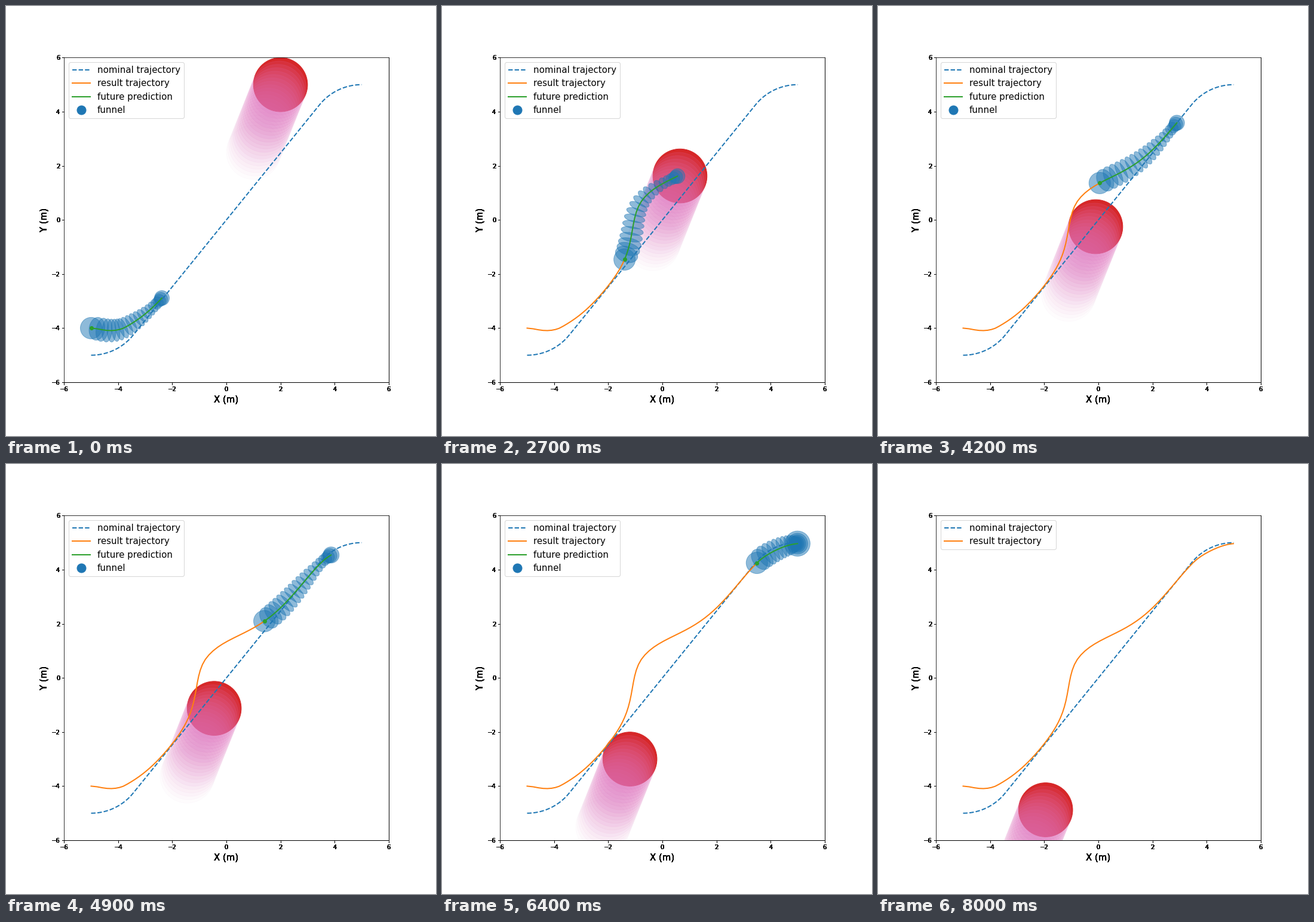
Animation, 720 px wide and 720 px high, one loop 8.1 s. Source, as a matplotlib script:

```python
import numpy as np
import matplotlib.pyplot as plt
from matplotlib.animation import FuncAnimation
from matplotlib.lines import Line2D
from matplotlib.patches import Circle, Ellipse

STEPS = 80
HORIZON = 20
UNIT = 45.3  # pixels per metre

# Nominal path: arc, straight line through the origin, arc
GOAL = 5
RADIUS = 2
SLOPE = np.arctan(0.6) + np.arcsin(2 / np.sqrt(34))
STRAIGHT = (GOAL - RADIUS * np.sin(SLOPE)) / np.cos(SLOPE)
HALF = STRAIGHT + RADIUS * SLOPE
LENGTH = 2 * HALF


def nominal(s):
    """Point and left normal at distance s along the nominal path."""
    v = np.clip(s, 0, LENGTH) - HALF
    heading = np.minimum(SLOPE, (HALF - np.abs(v)) / RADIUS)
    normal = np.array([-np.sin(heading), np.cos(heading)])
    arc = np.sign(v) * (np.array([[GOAL], [GOAL - RADIUS]]) + RADIUS * normal)
    line = np.outer([np.cos(SLOPE), np.sin(SLOPE)], v)
    return np.where(np.abs(v) < STRAIGHT, line, arc), normal


def bell(x, width):
    return np.exp(-(x / width) ** 2)


def travelled(t):
    """Distance at step t: quick start, hesitation, soft stop."""
    s = 0.1995 * t + 0.28 * t * np.exp(-t / 4) - 0.16 * bell(t - 29, 10)
    return s - 0.4 * np.log1p(np.exp((s - LENGTH) / 0.4))


def drive(t, evade=1.0):
    s = travelled(t)
    swerve = s - HALF - 0.15
    offset = (bell(s, 1.93) - 0.1 * bell(s - 13.6, 0.9)
              + evade * 1.04 * bell(swerve, np.where(swerve < 0, 1.6, 1.92)))
    point, normal = nominal(s)
    return point + offset * normal


def predict(step):
    j = np.arange(HORIZON + 1)
    tau = step + j - 0.069 * np.clip(j - 14, 0, None) ** 2
    return drive(tau, np.clip((step - 14) / 6, 0, 1))


def funnel_axes(step):
    """Half axes along and across the path, in metres."""
    j = np.arange(HORIZON + 1)
    end = min(24, 12.5 + 11 * (step / 66) ** 8)
    grow = np.clip((j - 13) / 7, 0, 1) ** 2
    lengthwise = 6 + 12 * np.exp(-j / 1.9) + (end - 6) * grow
    across = (20 - 2 * np.exp(-j)) * (1 - (j / HORIZON) ** 2) + end * grow
    return lengthwise / UNIT, across / UNIT


def obstacle_at(step):
    return 2 - 0.05 * step, 5 - 0.125 * step


def overdraw(artist, times=10):
    """Harden the soft edges by drawing repeatedly."""
    draw = artist.draw

    def repeat(renderer):
        for _ in range(times):
            draw(renderer)
    artist.draw = repeat


plt.rcParams.update({"font.family": "DejaVu Sans", "font.size": 10})
fig = plt.figure(figsize=(10, 10), dpi=72, facecolor="white")
ax = fig.add_axes([0.135, 0.125, 0.755, 0.755])
ax.set(xlim=(-6, 6), ylim=(-6, 6), xticks=range(-6, 7, 2), yticks=range(-6, 7, 2))
ax.set_xlabel("X (m)", fontsize=15)
ax.set_ylabel("Y (m)", fontsize=15)
for axis in (ax.xaxis, ax.yaxis):
    overdraw(axis.label)
    for tick in axis.get_major_ticks():
        overdraw(tick.label1)
        overdraw(tick.tick1line)
for side in ("right", "bottom"):
    overdraw(ax.spines[side])

result = drive(np.arange(STEPS + 1))
nominal_line, = ax.plot(*nominal(np.linspace(0, LENGTH, 201))[0], "--", lw=2,
                        color="tab:blue", label="nominal trajectory")
result_line, = ax.plot([], [], lw=2, color="tab:orange", label="result trajectory")
future_line, = ax.plot([], [], lw=2, color="tab:green", label="future prediction")
robot, = ax.plot([], [], "o", ms=6, color="tab:green")
funnel_key = Line2D([], [], ls="none", marker="o", ms=15, color="tab:blue", label="funnel")

obstacle = ax.add_patch(Circle((0, 0), 1, color="tab:red"))
trail = [ax.add_patch(Circle((0, 0), 1, color="tab:pink", alpha=0.14 * (1 - j / 23)))
         for j in range(1, HORIZON + 1)]
funnel = [ax.add_patch(Ellipse((0, 0), 1, 1, color="tab:blue", alpha=0.5))
          for _ in range(HORIZON + 1)]

handles = [nominal_line, result_line, future_line, funnel_key]
full_legend = ax.legend(handles=handles, loc="upper left", fontsize=15)
ax.add_artist(full_legend)
short_legend = ax.legend(handles=handles[:2], loc="upper left", fontsize=15)


def update(step):
    running = step < STEPS
    result_line.set_data(*result[:, :step + 1])

    now = min(step, STEPS - 1)
    obstacle.center = obstacle_at(now)
    for j, ghost in enumerate(trail, 1):
        ghost.center = obstacle_at(now + j)

    path = predict(now)
    future_line.set_data(*path)
    robot.set_data(path[0, :1], path[1, :1])
    dx, dy = np.gradient(path, axis=1)
    headings = np.degrees(np.arctan2(dy, dx))
    for ring, center, angle, a, b in zip(funnel, path.T, headings, *funnel_axes(now)):
        ring.set_center(center)
        ring.set_width(2 * a)
        ring.set_height(2 * b)
        ring.set_angle(angle)

    for artist in (future_line, robot, full_legend, *funnel):
        artist.set_visible(running)
    short_legend.set_visible(not running)
    return []


anim = FuncAnimation(fig, update, frames=STEPS + 1, interval=100,
                     repeat=True, repeat_delay=0, blit=False)
plt.show()
```
